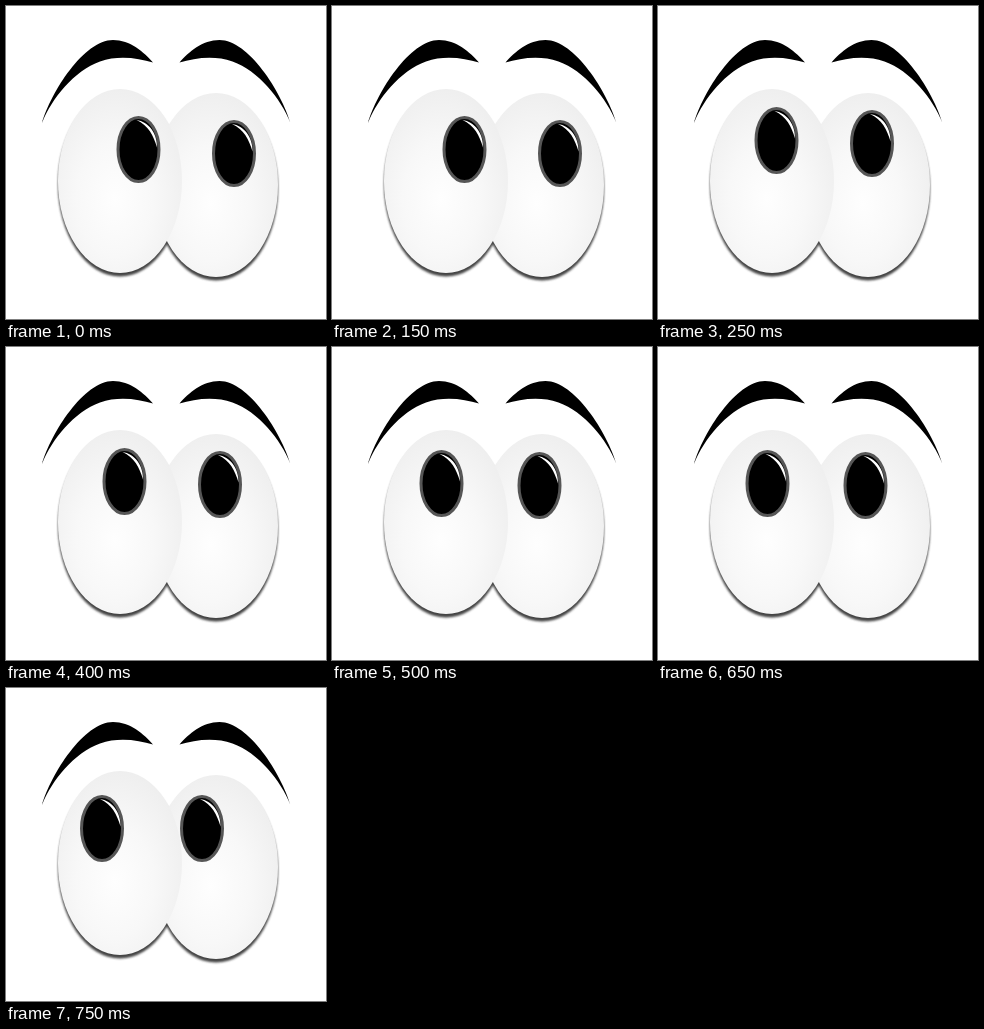
Write an HTML page that moves like this. It is 320x313 px and loops after 1000 ms.

```html
<!DOCTYPE html>
<html lang="en">
<head>
<meta charset="utf-8">
<title>Rolling eyes</title>
<style>
  html, body { margin: 0; width: 100%; height: 100%; overflow: hidden; background: #fff; }
  svg { display: block; width: 100%; height: 100%; }
</style>
</head>
<body>
<svg viewBox="0 0 320 313">
  <defs>
    <radialGradient id="white" cx=".46" cy=".6" r=".62">
      <stop offset="0" stop-color="#fefefe"/>
      <stop offset=".5" stop-color="#f8f8f8"/>
      <stop offset="1" stop-color="#eeeeee"/>
    </radialGradient>
    <filter id="soft" x="-10%" y="-10%" width="120%" height="120%">
      <feGaussianBlur stdDeviation="1.1"/>
    </filter>
    <ellipse id="ball" rx="62" ry="92"/>
    <path id="brow" d="M36 117C45 86 78 34 107 34C124 34 138 46 147 56.500C132 52 112 49 94 55.500C68 65 46 92 36 117Z"/>
    <g id="pupil">
      <ellipse rx="20.500" ry="32" stroke="#565656" stroke-width="3"/>
      <path d="M-2 -29.500C10 -28 19 -16 18.500 -2C15 -14 10 -24 -2 -29.500Z" fill="#fff"/>
    </g>
  </defs>
  <use href="#brow"/>
  <use href="#brow" transform="translate(320.500) scale(-1 1)"/>
  <g fill="#444" filter="url(#soft)">
    <use href="#ball" x="114" y="178.500"/>
    <use href="#ball" x="210" y="182.500"/>
  </g>
  <g fill="url(#white)">
    <use href="#ball" x="210" y="179"/>
    <use href="#ball" x="114" y="175"/>
  </g>
  <use id="left" href="#pupil"/>
  <use id="right" href="#pupil"/>
</svg>
<script>
  const STEP = 250;
  const gazes = [
    { left: [132.5, 143.5], right: [228, 147.5] },
    { left: [118.5, 134.5], right: [214, 137.5] },
    { left: [109.5, 136.5], right: [207.5, 138.5] },
    { left: [96, 140.5], right: [196, 140.5] }
  ];
  const pupils = ["left", "right"].map(id => document.getElementById(id));

  function draw(time) {
    const gaze = gazes[Math.floor(time / STEP) % gazes.length];
    for (const pupil of pupils) {
      pupil.setAttribute("transform", `translate(${gaze[pupil.id]})`);
    }
  }

  const start = performance.now();
  function tick(now) {
    draw(Math.max(0, now - start));
    requestAnimationFrame(tick);
  }
  draw(0);
  requestAnimationFrame(tick);
</script>
</body>
</html>
```
